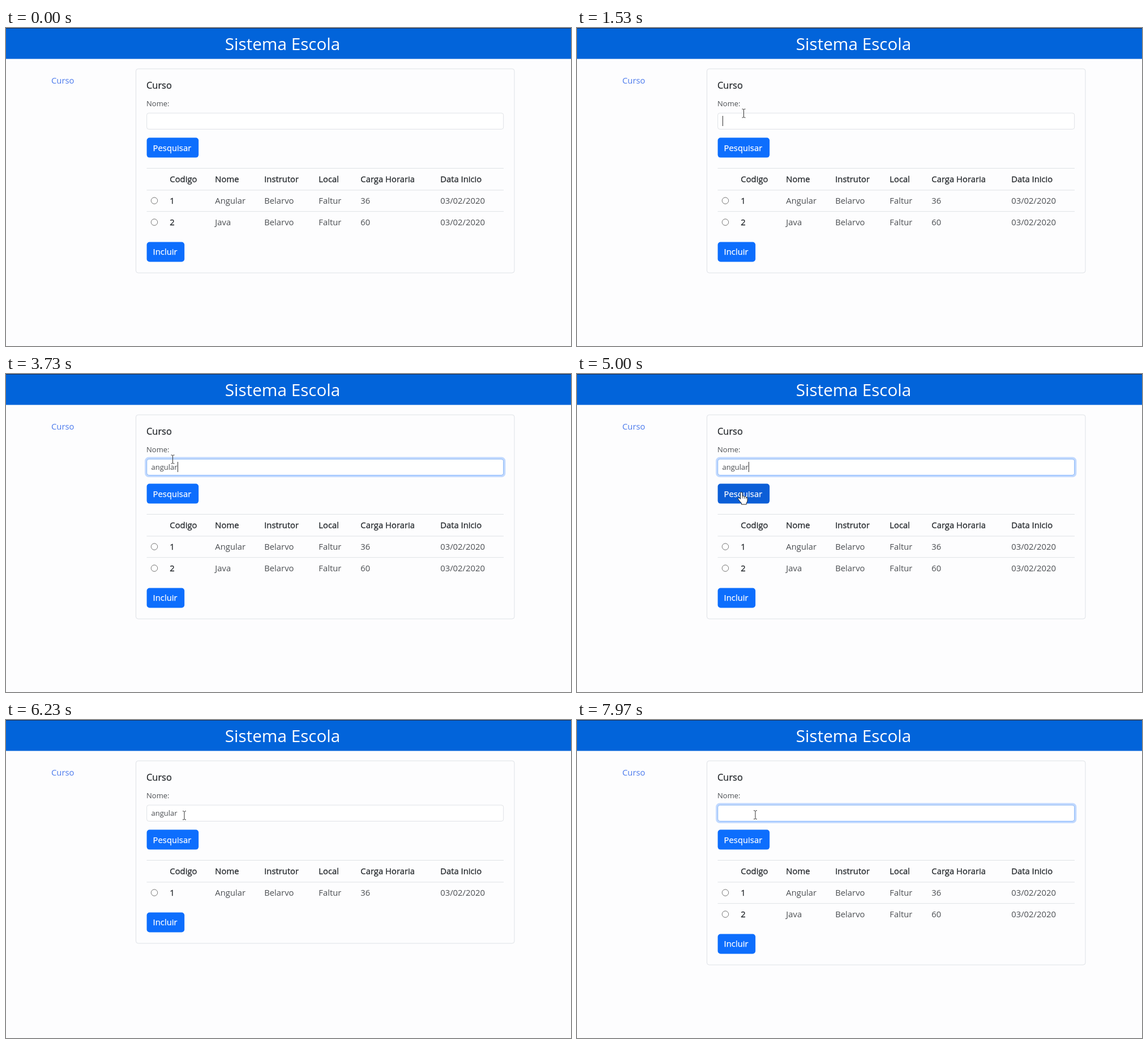
Recreate the animation shown at these times as an HTML page. Size 998 by 561 pixels, loop 8 s.

```html
<!DOCTYPE html>
<html lang="pt-BR">
<head>
<meta charset="utf-8">
<title>Sistema Escola</title>
<style>
  html, body { margin: 0; width: 100%; height: 100%; overflow: hidden; background: #fdfdfe; }
  svg { display: block; }
  text { font: 14.83px "Open Sans", "Noto Sans", sans-serif; fill: #4b4e52; white-space: pre; }
  .strong { fill: #24282c; stroke: #24282c; stroke-width: .3px; }
  .small { font-size: 13px; }
  .btn { fill: #fff; stroke: #fff; stroke-width: .25px; }
  .line { fill: none; stroke: #dee2e6; }
  .radio { fill: #fff; stroke: #767676; }
</style>
</head>
<body>
<svg width="998" height="561" viewBox="0 0 998 561">
  <rect width="998" height="561" fill="#fdfdfe"/>
  <rect width="998" height="54.5" fill="#0264da"/>
  <rect width="998" height="1" fill="#1c3158"/>
  <text x="386.7" y="39" style="font-size:29.7px;fill:#fff">Sistema Escola</text>
  <text x="80" y="97.6" style="fill:#4a79ec">Curso</text>

  <rect id="card" class="line" x="229.5" y="72" width="668.5" height="360" rx="4"/>
  <text class="strong" x="248" y="107" style="font-size:16.4px">Curso</text>
  <text class="small" x="248" y="137.5">Nome:</text>

  <rect id="ring" x="247" y="148.3" width="633.5" height="31.9" rx="5" fill="none" stroke="#0d6efd" stroke-opacity=".25" stroke-width="3.6"/>
  <rect x="248.7" y="150.1" width="630" height="28.4" rx="3.6" fill="#fff" stroke="#dfe2e6"/>
  <rect id="edge" x="248.7" y="150.1" width="630" height="28.4" rx="3.6" fill="none" stroke="#86b7fe"/>
  <text id="field" class="small" x="256.5" y="169"></text>
  <rect id="caret" y="155" width="1" height="18" fill="#333"/>

  <rect id="search" x="248.6" y="193.6" width="91.6" height="35" rx="5"/>
  <text class="btn" x="259.6" y="216.6">Pesquisar</text>

  <path class="line" d="M248.5 247.5H879M248.5 286H879"/>
  <g id="table"></g>
  <g id="second">
    <path class="line" d="M248.5 323.7H879"/>
  </g>
  <g id="add">
    <rect x="248.6" y="377.5" width="66.6" height="35" rx="5" fill="#0d6efd"/>
    <text class="btn" x="259.6" y="400.4">Incluir</text>
  </g>

  <g id="beam" fill="none" stroke="#333">
    <path d="M-3 -7.5H-1L0 -6.5L1 -7.5H3M0 -6.5V6.5M-3 7.5H-1L0 6.5L1 7.5H3"/>
  </g>
  <g id="arrow" fill="#fff" stroke="#222" stroke-linejoin="round">
    <path d="M0 0V16L3.7 12.5L6.2 18.3L8.6 17.2L6.2 11.6H11.3Z"/>
  </g>
  <g id="hand" fill="#fff" stroke="#222" stroke-linejoin="round">
    <path d="M-1.8 12V1.6Q-1.8 0 0 0T1.8 1.6V7Q4.6 5.8 5 8Q7.6 7 8.2 9Q10.6 8.4 10.6 11V14.5Q10.6 17 8.8 19V21.5H0V19.5Q-3.6 15.5 -5.8 12Q-6.6 10 -4.6 9.8Q-3.2 10.2 -1.8 12Z"/>
    <path d="M1.8 7V11M5 8V11.5M8.2 9V12" stroke-width=".8"/>
  </g>
</svg>
<script>
const $ = id => document.getElementById(id);
const NS = 'http://www.w3.org/2000/svg';
const LOOP = 8000, CLICK = 1530, PRESS = 5070, FILTER = 5230, REFOCUS = 6330, RESTORE = 7670;
const WORD = 'angular';
const typed = [2770, 2930, 3100, 3270, 3430, 3570, 3700];
const erased = [6700, 6870, 7030, 7200, 7370, 7420, 7470];
// time, x, y of the pointer's hot spot
const path = [
  [450, 400, 566], [1050, 362, 235], [1450, 294.5, 150.5], [4250, 294.5, 150.5],
  [4880, 290.5, 208.5], [5480, 290.5, 208.5], [6100, 315, 168.3],
  [7000, 315, 168.3], [7400, 315, 167.3], [LOOP, 315, 167.3]
];

const columns = [289.3, 369.3, 456.2, 552.3, 626.3, 767.2];
const rows = [
  ['Codigo', 'Nome', 'Instrutor', 'Local', 'Carga Horaria', 'Data Inicio'],
  ['1', 'Angular', 'Belarvo', 'Faltur', '36', '03/02/2020'],
  ['2', 'Java', 'Belarvo', 'Faltur', '60', '03/02/2020']
];

function add(parent, tag, attrs, text = '') {
  const el = document.createElementNS(NS, tag);
  for (const key in attrs) el.setAttribute(key, attrs[key]);
  el.textContent = text;
  parent.append(el);
}

rows.forEach((row, r) => {
  const group = $(r === 2 ? 'second' : 'table');
  const y = 272.4 + 38 * r;
  if (r) add(group, 'circle', { class: 'radio', cx: 262, cy: y - 5.8, r: 5.7 });
  row.forEach((cell, c) =>
    add(group, 'text', { x: columns[c], y, class: !r || !c ? 'strong' : '' }, cell));
});

const clamp = v => Math.min(1, Math.max(0, v));
const smooth = v => v * v * (3 - 2 * v);
const fade = (t, start) => smooth(clamp((t - start) / 150));
const show = (id, on) => $(id).setAttribute('visibility', on ? 'visible' : 'hidden');

function pointerAt(t) {
  const i = path.findIndex((p, n) => n && t < p[0]);
  const [a, b] = [path[i - 1], path[i]];
  const k = smooth(clamp((t - a[0]) / (b[0] - a[0])));
  return [a[1] + (b[1] - a[1]) * k, a[2] + (b[2] - a[2]) * k];
}

function drawPointer(t) {
  const [x, y] = pointerAt(t);
  const kind = y < 179 ? 'beam' : y > 193 && y < 229 && x < 340 ? 'hand' : 'arrow';
  for (const id of ['beam', 'arrow', 'hand']) show(id, t >= path[0][0] && id === kind);
  $(kind).setAttribute('transform', `translate(${x} ${y})`);
}

function drawField(t) {
  const past = times => times.filter(time => time <= t);
  $('field').textContent = WORD.slice(0, past(typed).length - past(erased).length);

  const ring = t < PRESS ? fade(t, CLICK) : t < REFOCUS ? 1 - fade(t, PRESS) : fade(t, REFOCUS);
  $('ring').style.opacity = $('edge').style.opacity = ring;

  const focused = t >= CLICK && t < PRESS || t >= REFOCUS;
  const last = Math.max(...past([CLICK, REFOCUS, ...typed, ...erased]));
  show('caret', focused && (t - last) % 1000 < 500);
  $('caret').setAttribute('x', Math.round(256.5 + $('field').getComputedTextLength()));
}

function drawList(t) {
  const short = t >= FILTER && t < RESTORE;
  show('second', !short);
  $('card').setAttribute('height', short ? 322 : 360);
  $('add').setAttribute('transform', `translate(0 ${short ? -38 : 0})`);

  const hover = fade(t, 4720) - fade(t, 5700);
  const mix = (a, b) => Math.round(a + (b - a) * hover);
  $('search').setAttribute('fill', `rgb(${mix(13, 11)},${mix(110, 94)},${mix(253, 215)})`);
}

const start = performance.now();
function draw(now) {
  const t = Math.max(0, now - start) % LOOP;
  drawField(t);
  drawList(t);
  drawPointer(t);
  requestAnimationFrame(draw);
}
draw(start);
</script>
</body>
</html>
```
